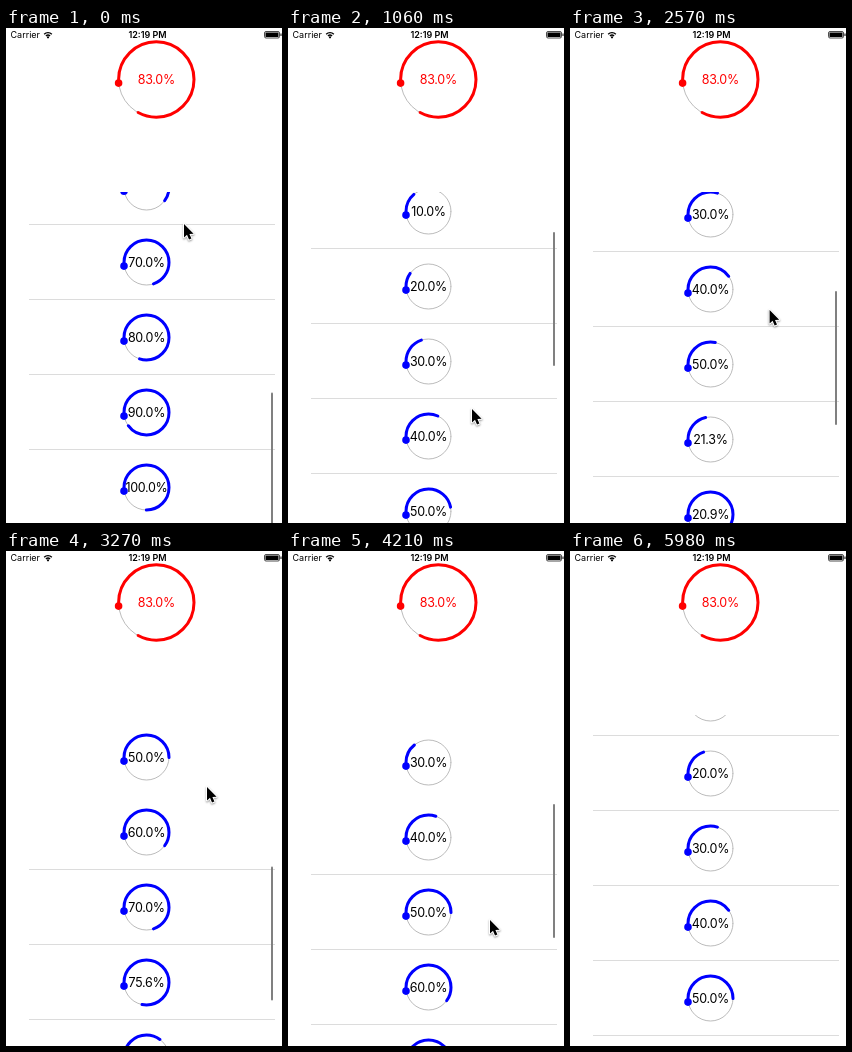
Write an HTML page with a canvas that moves like this. It is 276 px wide and 495 px high and loops after 6.1 s.

```html
<!DOCTYPE html>
<html>
<head>
<meta charset="utf-8">
<style>
html, body { margin: 0; width: 100%; height: 100%; overflow: hidden; background: #fff; }
canvas { display: block; width: 276px; height: 495px; }
</style>
</head>
<body>
<canvas></canvas>
<script>
const W = 276, H = 495, TOP = 164, ROW = 75, LOOP = 6100, STEP = 116.7, LAST = 51;
const FILL = 5.3; // steps a ring needs to fill after its row appears
const canvas = document.querySelector('canvas');
const g = canvas.getContext('2d');
const dpr = window.devicePixelRatio || 1;
canvas.width = W * dpr;
canvas.height = H * dpr;
g.scale(dpr, dpr);

// [step, scroll offset]
const scrollKeys = [
  [-5, 410], [0, 492], [3, 490], [4.2, 440], [4.8, 375], [5.5, 300], [6.4, 225], [7.7, 150],
  [9, 93], [11, 38], [13, 8], [14.3, 0], [18.1, 0], [19, 44], [20.1, 119], [20.41, 194],
  [22, 240], [22.83, 269], [25.93, 344], [28, 370], [31, 395], [32, 375], [33.5, 300],
  [34.7, 251], [36, 215], [38, 180], [40, 159], [42, 146], [45, 136], [48, 131], [51, 129]];
// [step, pointer x] and [step, pointer y]
const pointerX = [[0, 178], [9, 184], [18, 198], [28, 201], [36, 202], [42, 212], [45, 218]];
const pointerY = [
  [0, 196], [3, 198], [5.5, 381], [9, 381], [14, 384], [18.1, 396], [20.4, 292], [22, 282],
  [23.5, 298], [26, 252], [28, 236], [31, 234], [34.7, 367], [36, 369], [38, 392], [42, 485], [45, 520]];
const startArc = { 1: 15, 7: 55 }; // recycled rings that do not begin empty

// Monotone cubic interpolation
function along(keys, x) {
  const n = keys.length - 1;
  if (x <= keys[0][0]) return keys[0][1];
  if (x >= keys[n][0]) return keys[n][1];
  let i = 0;
  while (keys[i + 1][0] < x) i++;
  const slope = j => (keys[j + 1][1] - keys[j][1]) / (keys[j + 1][0] - keys[j][0]);
  const tangent = j => {
    if (j < 1 || j >= n) return 0;
    const a = slope(j - 1), b = slope(j);
    return a * b > 0 ? 2 * a * b / (a + b) : 0;
  };
  const [x0, y0] = keys[i], [x1, y1] = keys[i + 1];
  const h = x1 - x0, t = (x - x0) / h, u = 1 - t;
  return u * u * (1 + 2 * t) * y0 + t * t * (3 - 2 * t) * y1
    + h * t * u * (u * tangent(i) - t * tangent(i + 1));
}

const rowTop = (row, step) => TOP + ROW * row - along(scrollKeys, step);

function filled(row, step) {
  let age = 0;
  while (age < FILL) {
    const y = rowTop(row, step - age);
    if (y >= H || y + ROW <= TOP) break;
    age += 0.01;
  }
  return Math.min(1, age / FILL);
}

function text(str, x, y, size, color, weight = 400, align = 'center', spacing = '0px') {
  g.font = `${weight} ${size}px Inter, sans-serif`;
  g.letterSpacing = spacing;
  g.textAlign = align;
  g.fillStyle = color;
  g.fillText(str, x, y + size * 0.364);
}

function arc(x, y, r, from, to, color, width) {
  g.beginPath();
  g.arc(x, y, r, from, to);
  g.strokeStyle = color;
  g.lineWidth = width;
  g.stroke();
}

function disc(x, y, r, color) {
  g.beginPath();
  g.arc(x, y, r, 0, 7);
  g.fillStyle = color;
  g.fill();
}

function ring(x, y, r, percent, label, color, textColor) {
  g.lineCap = 'round';
  arc(x, y, r, 0, 7, '#aaa', 0.8);
  if (percent > 0) arc(x, y, r, Math.PI, Math.PI * (1 + percent / 50), color, 3);
  disc(x - r, y + 3.6, 3.8, color);
  text(label.toFixed(1) + '%', x, y - 0.3, 12.5, textColor, 400, 'center', '-0.3px');
}

function statusBar() {
  text('Carrier', 4.5, 7, 9, '#000', 400, 'left');
  g.lineCap = 'butt';
  for (const r of [2.9, 5.4]) arc(42, 10, r, -Math.PI * 0.75, -Math.PI * 0.25, '#000', 1.4);
  disc(42, 9.3, 1.1, '#000');
  text('12:19 PM', 141.5, 7, 9, '#000', 600);
  g.beginPath();
  g.roundRect(258.5, 3.5, 15, 6.5, 1.5);
  g.lineWidth = 0.7;
  g.strokeStyle = '#000';
  g.stroke();
  g.fillRect(259.5, 4.5, 13, 4.5);
  g.fillRect(274.5, 5.5, 1, 2.5);
}

function table(step) {
  const offset = Math.round(along(scrollKeys, step));
  // The pressed row loses its separators
  const pressed = step > 23 && step < 32 ? 5 : step > 32 && step < 39 ? 3 : -9;
  g.save();
  g.beginPath();
  g.rect(0, TOP, W, H - TOP);
  g.clip();
  for (let row = 0; row <= 10; row++) {
    const y = TOP + ROW * row - offset;
    if (y >= H || y + ROW <= TOP) continue;
    if (row !== pressed && row !== pressed - 1) {
      g.fillStyle = '#dcdcdc';
      g.fillRect(23, y + ROW - 1, 246, 1);
    }
    const value = row * 10, k = filled(row, step), from = startArc[row] || 0;
    const counting = row > 5 && step > 18;
    const label = counting ? 20 + (value - 20) * k ** 3.336 : value;
    ring(140.5, y + 37.5, 22.5, from + (value - from) * k, label, '#00f', '#000');
  }
  g.globalAlpha = Math.max(0, Math.min(1, (50 - step) / 3));
  g.beginPath();
  g.roundRect(265, 166.5 + offset * 0.4025, 2, 134, 1);
  g.fillStyle = '#808080';
  g.fill();
  g.restore();
}

function pointer(x, y) {
  g.save();
  g.translate(x, y);
  g.beginPath();
  for (const [px, py] of [[0, 0], [0, 13.5], [3, 10.8], [5, 15.6], [7.4, 14.6], [5.4, 10], [9.6, 9.8]]) g.lineTo(px, py);
  g.closePath();
  g.shadowColor = 'rgba(0,0,0,.4)';
  g.shadowBlur = 2 * dpr;
  g.shadowOffsetY = dpr;
  g.lineWidth = 2;
  g.lineJoin = 'round';
  g.strokeStyle = '#fff';
  g.stroke();
  g.shadowColor = 'transparent';
  g.fillStyle = '#000';
  g.fill();
  g.restore();
}

function draw(step) {
  g.fillStyle = '#fff';
  g.fillRect(0, 0, W, H);
  statusBar();
  ring(150.3, 51.5, 37.7, 83, 83, '#f00', '#f00');
  table(step);
  pointer(along(pointerX, step), along(pointerY, step));
}

let shown = -1;
function tick() {
  const step = Math.min(LAST, Math.floor(performance.now() % LOOP / STEP));
  if (step !== shown) draw(shown = step);
  requestAnimationFrame(tick);
}
tick();
</script>
</body>
</html>
```
